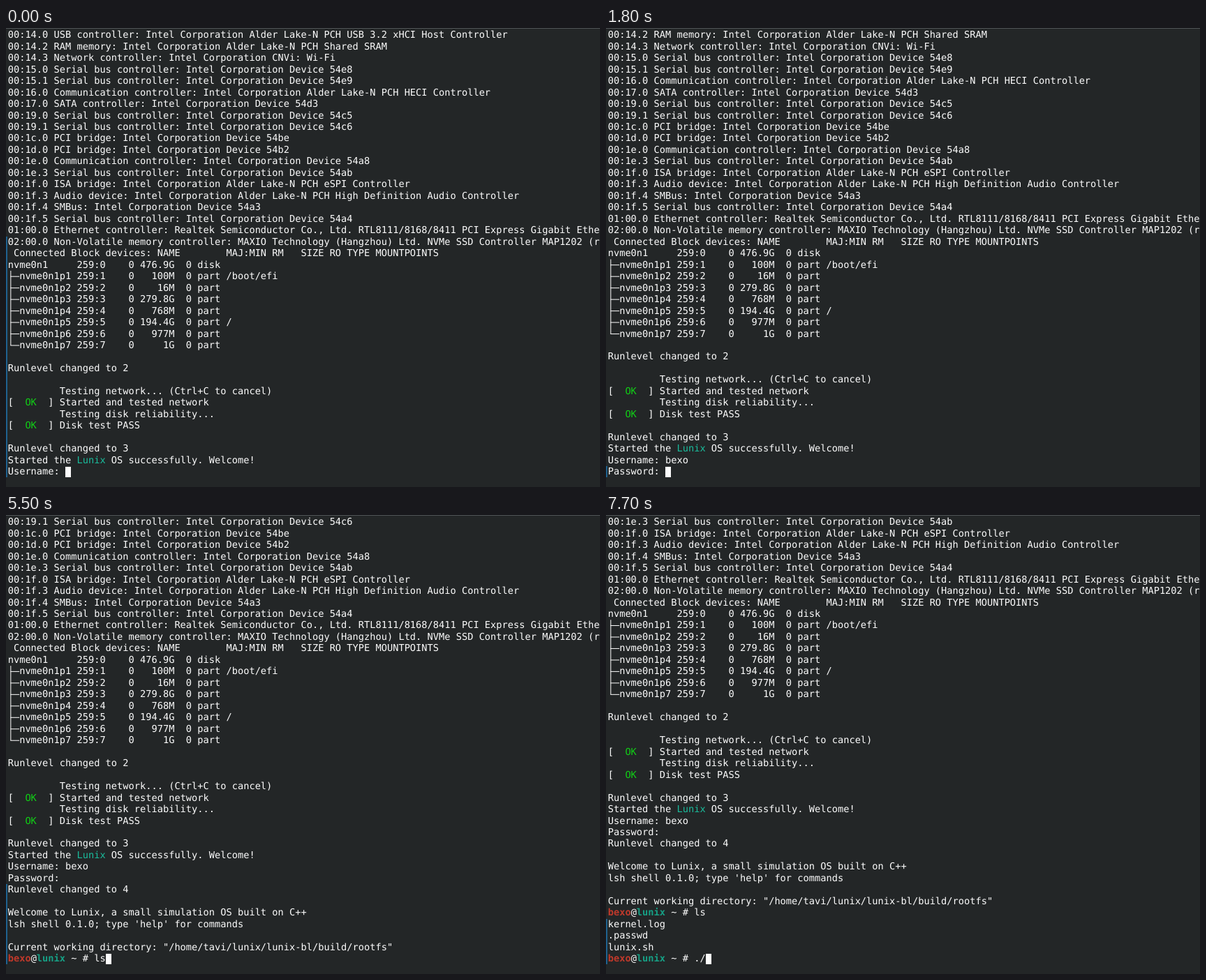
Animation of 851 by 658 pixels, one loop 8 s. Source, as an HTML page:

```html
<!DOCTYPE html>
<html lang="en">
<head>
<meta charset="utf-8">
<title>Terminal login</title>
<style>
html, body { margin: 0; width: 100%; height: 100%; overflow: hidden; background: #232627; }
svg { display: block; }
text {
  font-family: "DejaVu Sans Mono", "Noto Sans Mono", monospace;
  fill: #fcfcfc;
  white-space: pre;
  text-rendering: geometricPrecision;
}
.ok { fill: #11d116; }
.os { fill: #1abc9c; }
.user { fill: #c0392b; font-weight: bold; }
.host { fill: #16a085; font-weight: bold; }
</style>
</head>
<body>
<svg id="stage" width="851" height="658" viewBox="0 0 851 658"></svg>
<script>
const LOOP = 8000, ROWS = 39;
const LEFT = 2.7, TOP = 2, CELL = 8.24, ROW = 16.474, BASE = 12.2;
const FONT_SIZE = CELL / 0.60205;
const USER = "bexo";

// Styled runs are written as {class:text}.
const PROMPT = `{user:${USER}}@{host:lunix} ~ # `;
const bus = (slot, id, kind = "Serial bus") => `00:${slot} ${kind} controller: Intel Corporation Device ${id}`;
const lake = (slot, kind, part) => `00:${slot} ${kind}: Intel Corporation Alder Lake-N PCH ${part}`;
const bridge = (slot, id) => `00:${slot} PCI bridge: Intel Corporation Device ${id}`;
const disk = (n, size, mount = "") =>
  `  nvme0n1p${n} 259:${n}    0 ${size.padStart(6)}  0 part ${mount}`;
const passed = msg => `[  {ok:OK}  ] ${msg}`;
const indent = msg => " ".repeat(9) + msg;

const lines = [
  lake("14.0", "USB controller", "USB 3.2 xHCI Host Controller"),
  lake("14.2", "RAM memory", "Shared SRAM"),
  "00:14.3 Network controller: Intel Corporation CNVi: Wi-Fi",
  bus("15.0", "54e8"),
  bus("15.1", "54e9"),
  lake("16.0", "Communication controller", "HECI Controller"),
  bus("17.0", "54d3", "SATA"),
  bus("19.0", "54c5"),
  bus("19.1", "54c6"),
  bridge("1c.0", "54be"),
  bridge("1d.0", "54b2"),
  bus("1e.0", "54a8", "Communication"),
  bus("1e.3", "54ab"),
  lake("1f.0", "ISA bridge", "eSPI Controller"),
  lake("1f.3", "Audio device", "High Definition Audio Controller"),
  "00:1f.4 SMBus: Intel Corporation Device 54a3",
  bus("1f.5", "54a4"),
  "01:00.0 Ethernet controller: Realtek Semiconductor Co., Ltd. RTL8111/8168/8411 PCI Express Gigabit Ethe",
  "02:00.0 Non-Volatile memory controller: MAXIO Technology (Hangzhou) Ltd. NVMe SSD Controller MAP1202 (r",
  " Connected Block devices: NAME        MAJ:MIN RM   SIZE RO TYPE MOUNTPOINTS",
  "nvme0n1     259:0    0 476.9G  0 disk",
  disk(1, "100M", "/boot/efi"),
  disk(2, "16M"),
  disk(3, "279.8G"),
  disk(4, "768M"),
  disk(5, "194.4G", "/"),
  disk(6, "977M"),
  disk(7, "1G"),
  "",
  "Runlevel changed to 2",
  "",
  indent("Testing network... (Ctrl+C to cancel)"),
  passed("Started and tested network"),
  indent("Testing disk reliability..."),
  passed("Disk test PASS"),
  "",
  "Runlevel changed to 3",
  "Started the {os:Lunix} OS successfully. Welcome!",
  "Username: ",
  "Password: ",
  "Runlevel changed to 4",
  "",
  "Welcome to Lunix, a small simulation OS built on C++",
  "lsh shell 0.1.0; type 'help' for commands",
  "",
  'Current working directory: "/home/tavi/lunix/lunix-bl/build/rootfs"',
  PROMPT,
  "kernel.log",
  ".passwd",
  "lunix.sh",
  PROMPT
];
const TREE_START = 21, TREE_END = 27;

// Typed input: line index, text, time of each key.
const inputs = [
  { line: 38, text: USER, keys: [700, 900, 1200, 1400] },
  { line: 46, text: "ls", keys: [5400, 5500] },
  { line: 50, text: "./", keys: [7600, 7700] }
];

// Output bursts: last line, first highlighted line, time the highlight dims.
const bursts = [
  { at: 0, last: 38, fresh: 18, dim: 0 },
  { at: 1600, last: 39, fresh: 39, dim: 1800 },
  { at: 3300, last: 46, fresh: 40, dim: 3300 },
  { at: 5700, last: 50, fresh: 47, dim: 6000 }
];

const stage = document.getElementById("stage");
const NS = "http://www.w3.org/2000/svg";

function add(parent, tag, attrs = {}) {
  const el = document.createElementNS(NS, tag);
  for (const name in attrs) el.setAttribute(name, attrs[name]);
  return parent.appendChild(el);
}
const rect = (parent, x, y, width, height, fill) => add(parent, "rect", { x, y, width, height, fill });
const rowTop = row => TOP + row * ROW;

function writeLine(el, source) {
  for (const part of source.split(/(\{\w+:[^}]*\})/)) {
    if (!part) continue;
    const run = part.match(/^\{(\w+):(.*)\}$/);
    const span = add(el, "tspan", run ? { class: run[1] } : {});
    span.textContent = run ? run[2] : part;
  }
}

rect(stage, 0, 0, 851, 658, "#232627");
const screen = add(stage, "g");
const rows = lines.map((source, i) => {
  const el = add(screen, "text", { x: LEFT, y: rowTop(i) + BASE, "font-size": FONT_SIZE });
  writeLine(el, source);
  return el;
});

// Branch lines of the device tree.
const treeX = LEFT + CELL / 2 - 0.5;
const treeTop = rowTop(TREE_START);
rect(screen, treeX, treeTop, 1, (TREE_END - TREE_START + 0.5) * ROW, "#fcfcfc");
for (let i = TREE_START; i <= TREE_END; i++) {
  rect(screen, treeX, rowTop(i + 0.5) - 0.5, CELL * 1.5 + 0.5, 1, "#fcfcfc");
}

for (const input of inputs) input.span = add(rows[input.line], "tspan");
const plainLength = source => source.replace(/\{\w+:([^}]*)\}/g, "$1").length;

const bar = rect(stage, 0, 0, 2, 0, "#1d99f3");
const cursor = rect(stage, 0, 629, 8, 15, "#fcfcfc");
rect(stage, 0, 0, 851, 1, "#505456");

function draw(t) {
  const now = bursts.filter(b => b.at <= t).pop();
  const scroll = now.last - ROWS + 1;
  screen.setAttribute("transform", `translate(0 ${-scroll * ROW})`);
  rows.forEach((el, i) => {
    el.style.display = i >= scroll && i <= now.last ? "" : "none";
  });

  let column = plainLength(lines[now.last]);
  for (const input of inputs) {
    const count = input.keys.filter(k => k <= t).length;
    input.span.textContent = input.text.slice(0, count);
    if (input.line === now.last) column += count;
  }
  cursor.setAttribute("x", Math.round(LEFT + column * CELL));

  const top = Math.round(rowTop(now.fresh - scroll));
  bar.setAttribute("y", top);
  bar.setAttribute("height", 644 - top);
  bar.setAttribute("opacity", t < now.dim ? 1 : 0.5);
}

const start = performance.now();
function tick() {
  draw((performance.now() - start) % LOOP);
  requestAnimationFrame(tick);
}
draw(0);
requestAnimationFrame(tick);
</script>
</body>
</html>
```
